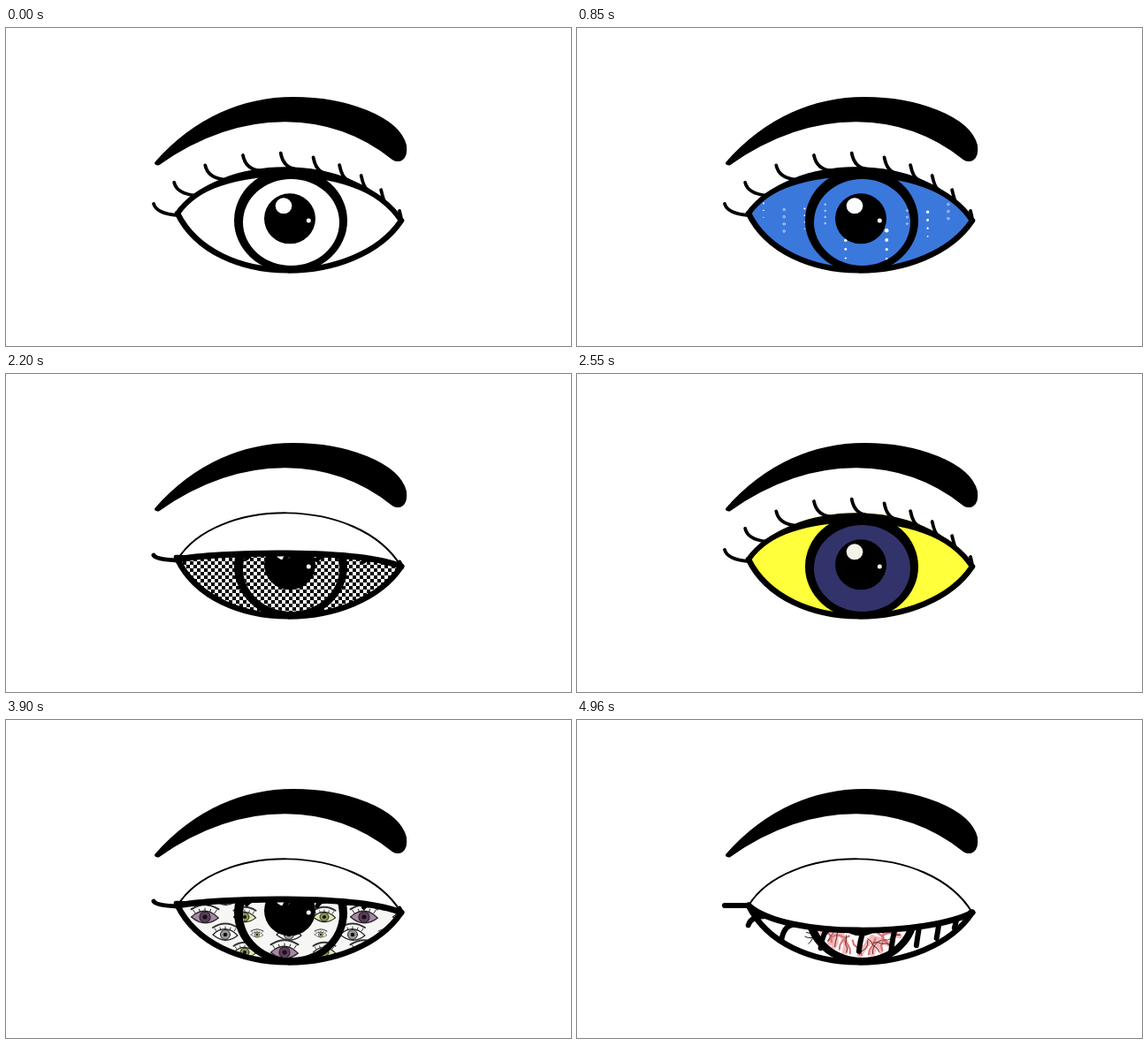
Recreate the animation shown at these times as an HTML page with a canvas. Size 639 by 360 pixels, loop 5030 ms.

```html
<!DOCTYPE html>
<html lang="en">
<head>
<meta charset="utf-8">
<title>Blinking eye</title>
<style>
html, body { margin: 0; width: 100%; height: 100%; overflow: hidden; background: #fff; }
canvas { display: block; }
</style>
</head>
<body>
<canvas id="stage" width="639" height="360"></canvas>
<script>
const ctx = document.getElementById('stage').getContext('2d');
const LOOP = 5030, CYCLE = 850, HOLD = 500, STEP = 70;
const TAU = Math.PI * 2;

// How far the lid has dropped in each step of a blink
const HALF = 0.39, LOW = 0.69, SHUT = 1;
const BLINK = [HALF, LOW, SHUT, LOW, HALF];
const LASHES = 10;
const BROW = new Path2D('M170 153C215 102 270 80 325 80C385 80 443 102 451 133' +
  'C453 149 444 151 438 147.5C370 93 270 85 172 153.5Z');

const mix = (a, b, k) => a + (b - a) * k;

// Lid curve from corner to corner: drop 0 is wide open, 1 is the lower rim
function lid(drop) {
  return [[194, 210], [237, mix(140, 297, drop)], [398, mix(137, 292, drop)], [447, 218]];
}

function pointAt([a, b, c, d], t) {
  const s = 1 - t;
  return [0, 1].map(i =>
    s * s * s * a[i] + 3 * s * s * t * b[i] + 3 * s * t * t * c[i] + t * t * t * d[i]);
}

function trace([a, b, c, d]) {
  ctx.beginPath();
  ctx.moveTo(...a);
  ctx.bezierCurveTo(...b, ...c, ...d);
}

function between(top, bottom) {
  const [a, b, c] = bottom;
  trace(top);
  ctx.bezierCurveTo(...c, ...b, ...a);
  ctx.closePath();
}

function stroke(width, color = '#000') {
  ctx.lineWidth = width;
  ctx.strokeStyle = color;
  ctx.stroke();
}

function fill(color) {
  ctx.fillStyle = color;
  ctx.fill();
}

function oval(x, y, rx, ry = rx) {
  ctx.beginPath();
  ctx.ellipse(x, y, rx, ry, 0, 0, TAU);
}

function flood(color) {
  ctx.fillStyle = color;
  ctx.fillRect(185, 150, 270, 135);
}

function seeded(seed) {
  return () => (seed = (seed * 16807) % 2147483647) / 2147483647;
}

// Skins: each paints the white of the eye or the iris

function bubbles() {
  flood('#3b78dc');
  const rnd = seeded(2024);
  for (let i = 0; i < 10; i++) {
    const x = 211 + i * 23.2, y = 190 + rnd() * 45, r = 0.8 + rnd() * 1.5;
    for (let j = 0; j < 4; j++) {
      oval(x, y + j * (5 + r * 2.5), i % 2 ? r : r * (1 - j * 0.15));
      if (i % 2) stroke(0.8, '#dce8ff');
      else fill('#fff');
    }
  }
}

function checks() {
  flood('#fff');
  ctx.fillStyle = '#000';
  const size = 4;
  for (let y = 152, row = 0; y < 284; y += size, row++)
    for (let x = 188 + (row % 2) * size; x < 452; x += 2 * size) ctx.fillRect(x, y, size, size);
}

function smallEye(x, y, size, iris, white) {
  ctx.save();
  ctx.translate(x, y);
  ctx.scale(size, size);
  ctx.beginPath();
  ctx.moveTo(-14, 0);
  ctx.quadraticCurveTo(0, -13, 14, 1);
  ctx.quadraticCurveTo(0, 12, -14, 0);
  fill(white);
  stroke(1.2, '#222');
  oval(0, 0, 5.5);
  fill(iris);
  stroke(1, '#222');
  oval(0, 0, 2.3);
  fill('#111');
  ctx.beginPath();
  for (let i = -2; i <= 2; i++) {
    ctx.moveTo(i * 5, Math.abs(i) - 6);
    ctx.lineTo(i * 6, Math.abs(i) - 9);
  }
  stroke(0.9, '#222');
  ctx.beginPath();
  ctx.moveTo(-14, -8);
  ctx.quadraticCurveTo(0, -17, 14, -8);
  stroke(2, '#333');
  ctx.restore();
}

function manyEyes() {
  flood('#f6f6f4');
  for (let row = 5; row >= 0; row--) {
    const y = 263 - row * 20;
    for (let i = 0; i < 7; i++) {
      const odd = i % 2;
      if (row % 2) smallEye(212 + i * 36, y, odd ? 1 : 0.5, odd ? '#9a9a9e' : '#b3bd6e', '#fff');
      else if (odd) smallEye(225 + i * 45, y, 0.9, '#8d9650', '#dfe5b4');
      else smallEye(225 + i * 45, y, 1.1, '#5f3b5e', '#a787a4');
    }
  }
}

function drops(back, front, left, pitch) {
  flood(back);
  ctx.beginPath();
  for (let row = 0; row < 6; row++) {
    const y = 175 + row * 21.6;
    for (let x = left + (row % 2 / 2 - 1) * pitch; x < 460; x += pitch) {
      ctx.moveTo(x, y - 9);
      ctx.bezierCurveTo(x + 2, y - 4, x + 6, y - 1, x + 6, y + 3);
      ctx.bezierCurveTo(x + 6, y + 9.5, x - 6, y + 9.5, x - 6, y + 3);
      ctx.bezierCurveTo(x - 6, y - 1, x - 2, y - 4, x, y - 9);
    }
  }
  fill(front);
}

function vein(rnd, x, y, angle, steps, size) {
  ctx.moveTo(x, y);
  for (let i = 0; i < steps; i++) {
    angle += (rnd() - 0.5) * 1.3;
    x += Math.cos(angle) * size;
    y += Math.sin(angle) * size;
    ctx.lineTo(x, y);
  }
}

function scribble() {
  flood('#fff');
  const rnd = seeded(41);
  ctx.beginPath();
  for (let i = 0; i < 5; i++) vein(rnd, 272, 236 + i * 2.5, Math.PI, 4, 3.6);
  stroke(0.9);
}

function veins() {
  flood('#fff');
  const rnd = seeded(97);
  const layer = (width, color) => {
    ctx.beginPath();
    for (let i = 0; i < 24; i++) {
      const a = (i + rnd() * 0.6) / 24 * TAU;
      vein(rnd, 322 + Math.cos(a) * 50, 220 + Math.sin(a) * 46, a + Math.PI, 4, 5);
    }
    stroke(width, color);
  };
  layer(6, '#f6b9b9');
  layer(2.2, '#de7479');
  layer(0.9, '#4a1c1e');
}

const plain = color => () => flood(color);
const SKINS = [
  [plain('#fff'), plain('#fff')],
  [bubbles, bubbles],
  [checks, checks],
  [plain('#ffff3c'), plain('#33336b'), '#f2f2e8'],
  [manyEyes, manyEyes],
  [() => drops('#ff7f32', '#ffb84a', 211, 23), () => drops('#0088a8', '#2cc6d2', 207.2, 23.7)],
  [scribble, veins]
];

function eyeball([white, iris, glint = '#fff'], drop) {
  ctx.save();
  between(lid(drop), lid(1));
  ctx.clip();
  white();
  oval(322, 218, 64, 59);
  fill('#000');
  ctx.save();
  oval(322.5, 220, 54.5, 49);
  ctx.clip();
  iris();
  ctx.restore();
  oval(321, 215.8, 29, 28.5);
  fill('#000');
  oval(314, 201.3, 9.3, 9);
  fill(glint);
  oval(342.3, 218, 2.5);
  fill(glint);
  ctx.restore();
}

function lids(drop) {
  if (drop) {
    trace(lid(0));
    stroke(2);
    trace(lid(drop));
    stroke(7);
  } else {
    between(lid(0), lid(0.09));
    fill('#000');
    trace(lid(0.045));
    stroke(6);
  }
  trace(lid(1));
  stroke(6.5);
}

// Lashes point up when the eye is open and swing down with the lid
function lashes(drop) {
  const swing = Math.min(1, drop / LOW);
  for (let i = 0; i < LASHES; i++) {
    const u = i / (LASHES - 1), arch = Math.sin(Math.PI * u);
    const [x, y] = pointAt(lid(drop), u + 0.085 * arch * arch);
    const tipX = x - mix(27 - 25 * u, 2 + 25 * (1 - u) ** 2.5, swing);
    const tipY = y + mix(-11 - 5 * arch, 24 * Math.abs(arch) ** 0.8, swing);
    ctx.beginPath();
    ctx.moveTo(tipX, tipY);
    ctx.quadraticCurveTo(tipX + 3, y, x, y + 2 * (1 - swing));
    stroke(mix(3.8, 6, swing));
  }
}

function draw(t) {
  const turn = Math.floor(t / CYCLE);
  const step = Math.floor((t % CYCLE - HOLD) / STEP);
  const drop = step < 0 ? 0 : BLINK[step];

  ctx.fillStyle = '#fff';
  ctx.fillRect(0, 0, 639, 360);
  ctx.lineCap = ctx.lineJoin = 'round';
  eyeball(SKINS[turn + (step >= 3 ? 1 : 0)], drop);
  lids(drop);
  lashes(drop);
  ctx.fillStyle = ctx.strokeStyle = '#000';
  ctx.lineWidth = 4;
  ctx.fill(BROW);
  ctx.stroke(BROW);
}

function tick() {
  draw(performance.now() % LOOP);
  requestAnimationFrame(tick);
}
tick();
</script>
</body>
</html>
```
